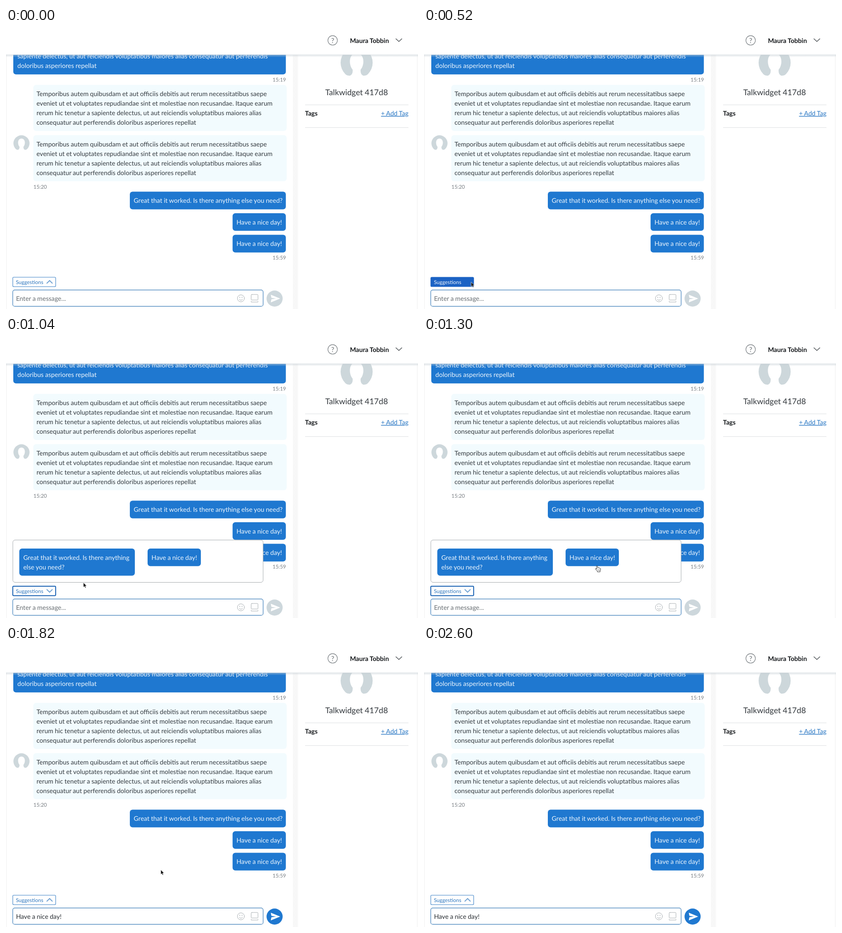
Write an HTML page that moves like this. It is 905 px wide and 619 px high and loops after 2730 ms.

```html
<!DOCTYPE html>
<html lang="en">
<head>
<meta charset="utf-8">
<title>Chat suggestions</title>
<style>
html, body { margin: 0; width: 100%; height: 100%; overflow: hidden; background: #fff; }
svg { display: block; width: 905px; height: 619px; }
text {
  font: 14.11px Lato, "Open Sans", sans-serif;
  word-spacing: -.02em;
  fill: #363c41;
  text-rendering: geometricPrecision;
  white-space: pre;
}
.time { font-size: 11.47px; fill: #777d82; }
.end { text-anchor: end; }
.bold { font-weight: 700; fill: #16191c; }
.title { font-size: 17.64px; text-anchor: middle; fill: #33383d; }
.link { fill: #2b78c4; text-decoration: underline 1px; }
.blue { fill: #1f78d0; }
.on-blue text { fill: #eef6fd; }
.pale { fill: #f2fbfe; }
.line { fill: none; stroke-linecap: round; stroke-linejoin: round; }
.rule { stroke: #dcdfe1; }
.icon { stroke: #a9afb3; }

/* One loop; every change is a hard cut. */
.panel, .typed, .hint, .send, .button, .label, .chevron, .pointer, .arrow, .hand {
  animation: 2.73s step-end infinite;
}
.panel { animation-name: panel; }
.typed { animation-name: typed; fill: #2a2f34; }
.hint { animation-name: hint; fill: #686e73; }
.send { animation-name: send; }
.button { animation-name: button; }
.label { animation-name: label; font-size: 11.47px; }
.chevron { animation-name: chevron; }
.pointer { animation-name: pointer; }
.arrow { animation-name: arrow; }
.hand { animation-name: hand; }

@keyframes panel { 0%, 66.66%, 100% { opacity: 0 } 28.57% { opacity: 1 } }
@keyframes typed { 0% { opacity: 0 } 66.66%, 100% { opacity: 1 } }
@keyframes hint { 0% { opacity: 1 } 66.66%, 100% { opacity: 0 } }
@keyframes send { 0% { fill: #cdd7dc } 66.66%, 100% { fill: #1f78d0 } }
@keyframes button {
  0%, 66.66%, 100% { fill: #fff; stroke: #3a80c6; stroke-width: 1.1px }
  19.04% { fill: #1b62c4; stroke: #1b62c4; stroke-width: 1.1px }
  38.09% { fill: #fff; stroke: #1d64b4; stroke-width: 2px }
}
@keyframes label {
  0%, 38.09%, 100% { fill: #2b74bd }
  19.04% { fill: #f2f7fd }
}
@keyframes chevron {
  0%, 66.66%, 100% { stroke: #2b74bd; transform: scaleY(1) }
  19.04% { stroke: #1b62c4; transform: scaleY(1) }
  23.8% { stroke: #fff; transform: scaleY(1) }
  28.57% { stroke: #fff; transform: scaleY(-1) }
  38.09% { stroke: #2b74bd; transform: scaleY(-1) }
}
@keyframes pointer {
  0% { transform: translate(190px, 535px) }
  14.28% { transform: translate(146px, 550px) }
  19.04% { transform: translate(103.5px, 559.5px) }
  23.8% { transform: translate(96px, 559px) }
  38.09% { transform: translate(170px, 541px) }
  42.85% { transform: translate(310px, 514px) }
  47.61% { transform: translate(380px, 504px) }
  52.38% { transform: translate(376px, 498px) }
  57.14% { transform: translate(373px, 493.5px) }
  66.66% { transform: translate(340px, 493px) }
  71.42% { transform: translate(180px, 490px) }
  76.19%, 100% { transform: translate(61.5px, 488px) }
}
@keyframes arrow {
  0%, 23.8%, 47.61%, 80.95%, 100% { opacity: 0 }
  14.28%, 38.09%, 66.66% { opacity: 1 }
}
@keyframes hand {
  0%, 38.09%, 66.66%, 100% { opacity: 0 }
  23.8%, 47.61% { opacity: 1 }
}
</style>
</head>
<body>
<svg viewBox="0 0 905 619" xmlns="http://www.w3.org/2000/svg">
  <defs>
    <linearGradient id="shade" x2="0" y2="1">
      <stop stop-color="#c5ced4" stop-opacity=".6"/>
      <stop offset="1" stop-color="#c5ced4" stop-opacity="0"/>
    </linearGradient>
    <linearGradient id="gutter">
      <stop stop-color="#f8f8f8"/>
      <stop offset=".8" stop-color="#f7f7f7"/>
      <stop offset="1" stop-color="#fdfdfd"/>
    </linearGradient>
    <g id="visitor">
      <circle r="1" fill="#cdd7db"/>
      <path fill="#fff" d="M0-.6C.28-.6 .43-.36 .42-.05C.41 .18 .33 .33 .25 .43C.23 .6 .28 .74 .4 .8Q.55 .83 .72 .74L.8 1.05H-.8L-.72 .74Q-.55 .83-.4 .8C-.28 .74-.23 .6-.25 .43C-.33 .33-.41 .18-.42-.05C-.43-.36-.28-.6 0-.6Z"/>
    </g>
    <g id="received">
      <rect class="pale" x="60" width="556.5" height="101.6" rx="6"/>
      <text x="67" y="24.6">Temporibus autem quibusdam et aut officiis debitis aut rerum necessitatibus saepe</text>
      <text x="67" y="45.8">eveniet ut et voluptates repudiandae sint et molestiae non recusandae. Itaque earum</text>
      <text x="67" y="66.9">rerum hic tenetur a sapiente delectus, ut aut reiciendis voluptatibus maiores alias</text>
      <text x="67" y="88.1">consequatur aut perferendis doloribus asperiores repellat</text>
    </g>
    <g id="farewell" class="on-blue">
      <rect class="blue" width="117" height="38.8" rx="6"/>
      <text x="8.6" y="24.8">Have a nice day!</text>
    </g>
  </defs>

  <rect width="905" height="619" fill="#fff"/>
  <rect width="2" height="619" fill="#f7f7f7"/>
  <rect x="630" y="59" width="12" height="560" fill="url(#gutter)"/>
  <rect x="902.5" y="59" width="2.5" height="560" fill="#f8f8f8"/>

  <!-- Conversation -->
  <g class="on-blue">
    <rect class="blue" x="16" y="40" width="598.7" height="62.2" rx="6"/>
    <text x="25" y="67.3">sapiente delectus, ut aut reiciendis voluptatibus maiores alias consequatur aut perferendis</text>
    <text x="25" y="88.4">doloribus asperiores repellat</text>
  </g>
  <text class="time end" x="615" y="117.8">15:19</text>
  <use href="#received" y="125.2"/>
  <use href="#received" y="236"/>
  <use href="#visitor" transform="translate(34 254) scale(17.7)"/>
  <text class="time" x="60.3" y="353.7">15:20</text>
  <g class="on-blue">
    <rect class="blue" x="272" y="360.6" width="342.7" height="38.8" rx="6"/>
    <text x="280.6" y="385.4">Great that it worked. Is there anything else you need?</text>
  </g>
  <use href="#farewell" x="497.7" y="408"/>
  <use href="#farewell" x="497.7" y="455.6"/>
  <text class="time end" x="615" y="510.2">15:59</text>

  <!-- Visitor details -->
  <use href="#visitor" transform="translate(770.2 76.5) scale(35.2)"/>
  <text class="title" x="770" y="148">Talkwidget 417d8</text>
  <path class="rule" d="M657 169.3H884M657 219.3H884"/>
  <text class="bold" x="656.8" y="192.8">Tags</text>
  <text class="link end" x="884" y="192.8">+ Add Tag</text>

  <!-- Header -->
  <rect width="905" height="59" fill="#fff"/>
  <rect y="58.5" width="905" height="6" fill="url(#shade)"/>
  <circle class="line" cx="717.5" cy="27.3" r="10.4" stroke="#70767a" stroke-width="1.1"/>
  <text x="717.5" y="32.6" text-anchor="middle" style="font-size: 15px; fill: #666c70">?</text>
  <text class="bold" x="755.4" y="32.6">Maura Tobbin</text>
  <path class="line" d="M856.5 23.8L863 29.8L869.5 23.8" stroke="#44494d" stroke-width="1.3"/>

  <!-- Suggestions -->
  <g class="panel">
    <rect x="15" y="447.2" width="549.8" height="93.3" rx="5" fill="#fff" stroke="#a6abae"/>
    <g class="on-blue">
      <rect class="blue" x="29.2" y="466" width="253.8" height="59.8" rx="6"/>
      <text x="37.9" y="490.8">Great that it worked. Is there anything</text>
      <text x="37.9" y="512">else you need?</text>
    </g>
    <use href="#farewell" x="311" y="466"/>
  </g>
  <rect class="button" x="14.9" y="549" width="94.2" height="20.8" rx="2"/>
  <text class="label" x="21.7" y="563.6">Suggestions</text>
  <g transform="translate(95.7 559.3)">
    <path class="line chevron" d="M-6 3L0-3L6 3" stroke-width="1.4"/>
  </g>

  <!-- Message box -->
  <rect x="14.8" y="577.2" width="550" height="36" rx="4.5" fill="#fff" stroke="#3a7cb8" stroke-width="1.2"/>
  <text class="hint" x="21.9" y="600.7">Enter a message...</text>
  <text class="typed" x="21.9" y="600.7">Have a nice day!</text>
  <g class="line icon">
    <circle cx="516" cy="595.5" r="7.7"/>
    <path d="M512.3 597.6Q516 602 519.7 597.6"/>
    <path d="M513.5 593.2V593.4M518.5 593.2V593.4" stroke-width="1.8"/>
    <rect x="538.5" y="587" width="15" height="12.2" rx="1.5"/>
    <path d="M538.5 602V603.7H553.5V602"/>
  </g>
  <circle class="send" cx="590" cy="596" r="17.7"/>
  <path fill="#fff" d="M581.6 587.6L602.3 596L581.6 604.6L583 597.6L593 596L583 594.5Z"/>

  <!-- Pointer -->
  <g class="pointer">
    <path class="arrow" d="M0 0V10.3L2.4 8.2L4 11.8L5.7 11L4.2 7.6H7.3Z" fill="#111" stroke="#fff" stroke-width=".7"/>
    <g class="hand">
      <path d="M-1.2 1.2Q-1-.1 0 0Q1 .1 1.2 1.2L1.7 4.4Q3.2 3.5 3.9 4.7Q5.3 4.1 5.9 5.3Q7.5 4.9 7.8 6.4Q8.2 9.5 6.9 11.2V13.4H.9V12L-3.5 7.4Q-3.9 5.6-2.2 5.9L-.3 7.4Z" fill="#fff" stroke="#222" stroke-width=".9" stroke-linejoin="round"/>
      <path class="line" d="M2 8.3V10.8M3.8 8.3V10.8M5.5 8.3V10.8" stroke="#444" stroke-width=".6"/>
    </g>
  </g>
</svg>
</body>
</html>
```
